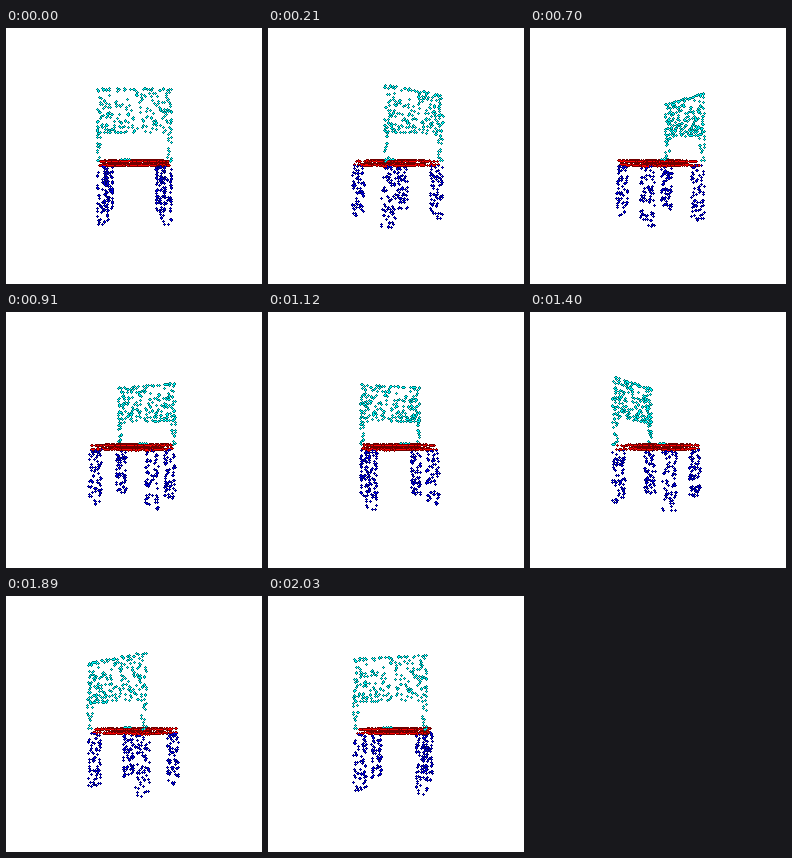
A matplotlib script for the animation above (2.1 s loop, 256 by 256 pixels).

```python
import numpy as np
import matplotlib.pyplot as plt
from matplotlib.animation import FuncAnimation

SIZE, FRAMES, STEP_MS = 256, 30, 70
CENTER, CAMERA = 128, 270
RADIUS, BULGE = 1.3, 30       # ball radius, how far its middle stands out
W, D, H = 33, 32, 60          # half width, half depth, half height
LEG, POST = 9, 3
CYAN, BLUE, RED = (0, 255, 255), (0, 0, 240), (255, 0, 0)

rng = np.random.default_rng(12)


def box(n, x, y, z):
    """Random points on the surface of a box, spread evenly by area."""
    lo, hi = np.array([x, y, z], float).T
    size = hi - lo
    area = np.prod(size) / size
    axis = rng.choice(3, n, p=area / area.sum())
    pts = lo + rng.random((n, 3)) * size
    side = rng.integers(0, 2, n)
    rows = np.arange(n)
    pts[rows, axis] = np.where(side, hi[axis], lo[axis])
    return pts


def make_chair():
    back = [
        box(225, (-W, W), (-H, -21), (28, D)),
        box(14, (-W, W), (-H, -H + 1), (28, D)),
        box(15, (-W, -W + POST), (-21, 4), (28, D)),
        box(15, (W - POST, W), (-21, 4), (28, D)),
        box(8, (-13, -2), (2.8, 3.4), (-2, 2)),
    ]
    legs = [
        box(75, x, (9, H), z)
        for x in ((-W, LEG - W), (W - LEG, W))
        for z in ((-D, LEG - D), (D - LEG, D))
    ]
    flat = (1 - W, W - 1), (-D, 28)
    seat = [box(330, flat[0], (y, y + 0.2), flat[1]) for y in (4.5, 8.2)]
    seat.append(box(30, flat[0], (4.5, 8.4), flat[1]))
    parts = [(back, CYAN), (legs, BLUE), (seat, RED)]
    pts = np.vstack([p for group, _ in parts for p in group])
    colors = np.vstack([np.tile(c, (sum(map(len, group)), 1))
                        for group, c in parts])
    return pts, colors.astype(float)


points, colors = make_chair()

# Ball stamp: pixel offsets and the height of the ball above each
dy, dx = np.mgrid[-1:2, -1:2].reshape(2, -1)
inside = dx ** 2 + dy ** 2 < RADIUS ** 2
dx, dy = dx[inside], dy[inside]
dome = np.sqrt(1 - (dx ** 2 + dy ** 2) / RADIUS ** 2)


def render(angle):
    """Draw the cloud as small shaded balls, nearest on top."""
    x, y, z = points.T
    c, s = np.cos(angle), np.sin(angle)
    rx, rz = x * c + z * s, z * c - x * s
    scale = CAMERA / (CAMERA - rz)
    cols = np.rint(CENTER + rx * scale).astype(int)[:, None] + dx
    rows = np.rint(CENTER + y * scale).astype(int)[:, None] + dy

    order = np.argsort((rz[:, None] + BULGE * dome).ravel())
    shaded = colors[:, None] * dome[:, None] ** 1.8
    img = np.full((SIZE, SIZE, 3), 255, np.uint8)
    img[rows.ravel()[order], cols.ravel()[order]] = shaded.reshape(-1, 3)[order]
    return img


fig = plt.figure(figsize=(SIZE / 100, SIZE / 100), dpi=100, facecolor="white")
ax = fig.add_axes([0, 0, 1, 1])
ax.axis("off")
picture = ax.imshow(render(0), interpolation="nearest", aspect="auto")


def update(i):
    picture.set_data(render(2 * np.pi * i / FRAMES))
    return [picture]


anim = FuncAnimation(fig, update, frames=FRAMES, interval=STEP_MS,
                     repeat=True, repeat_delay=0)
plt.show()
```
